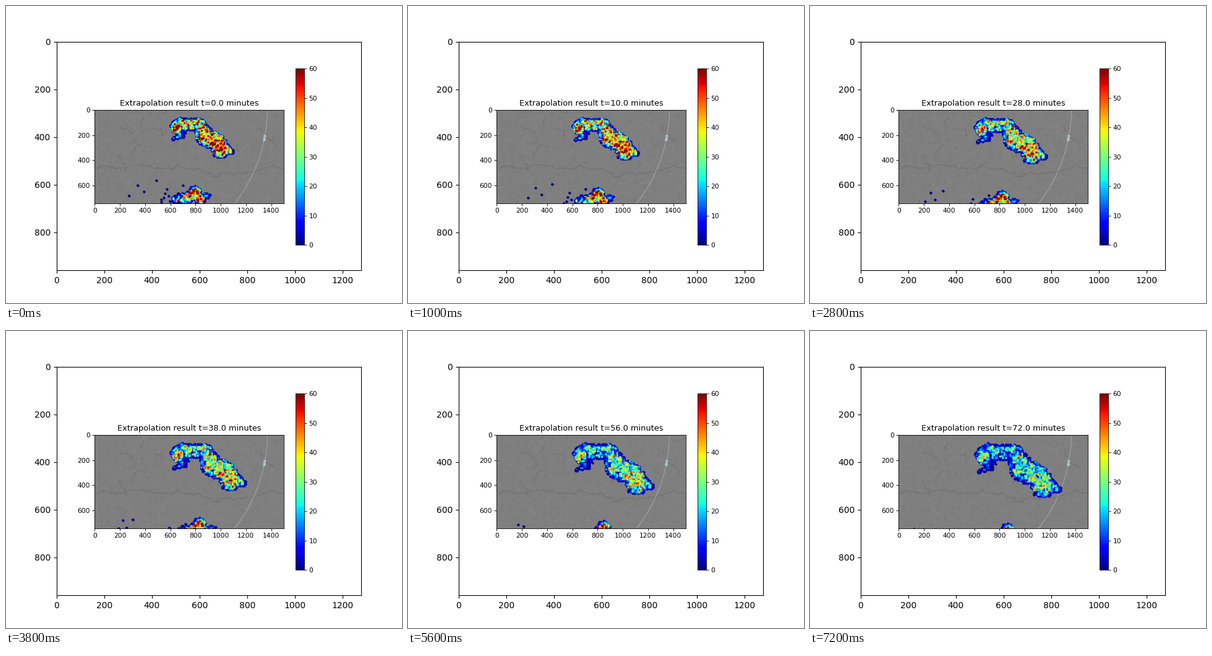
These frames come from a looping animation (640 px wide and 480 px high, 7400 ms). A matplotlib script:

```python
import numpy as np
import matplotlib.pyplot as plt
from matplotlib.animation import FuncAnimation
from matplotlib.cm import ScalarMappable
from matplotlib.colors import Normalize

W, H = 640, 480
FRAMES, INTERVAL, MINUTES = 37, 200, 2
ZOOM = 0.77                      # the inner figure is shown scaled down
LEFT, TOP, RIGHT, BOTTOM = 143.2, 167.7, 448.9, 319.0
UNIT = (RIGHT - LEFT) / 1500     # stage pixels per map unit

rng = np.random.default_rng(11)
fig = plt.figure(figsize=(W / 100, H / 100), dpi=100, facecolor="white")


def add_axes(x0, y0, x1, y1, **kw):
    """Axes placed by stage pixels, measured from the top left corner."""
    return fig.add_axes([x0 / W, 1 - y1 / H, (x1 - x0) / W, (y1 - y0) / H], **kw)


def shrink(axes):
    axes.tick_params(labelsize=10 * ZOOM, width=0.8 * ZOOM,
                     length=3.5 * ZOOM, pad=3.5 * ZOOM)
    for spine in axes.spines.values():
        spine.set_linewidth(0.8 * ZOOM)


def smooth_noise(passes, shape=(170, 320)):
    """Random field of unit deviation, softened by repeated blurring."""
    field = rng.normal(size=shape)
    for _ in range(passes):
        for axis in (0, 1):
            field = (np.roll(field, 1, axis) + 2 * field + np.roll(field, -1, axis)) / 4
    return field / field.std()


def sample(field, pts):
    col = np.clip((pts[:, 0] - LEFT).astype(int), 0, field.shape[1] - 1)
    row = np.clip((pts[:, 1] - TOP).astype(int), 0, field.shape[0] - 1)
    return field[row, col]


def draw_river(x, y, heading, steps):
    """A wandering line that keeps close to its first heading."""
    turn = heading + rng.normal(0, 0.75, steps)
    ax.plot(x + np.cumsum(2 * np.cos(turn)), y + np.cumsum(2 * np.sin(turn)),
            color="#4c4c4c", lw=0.5, alpha=0.45)


# Outer frame
outer = add_axes(81.6, 57.6, 574.4, 427.2, xlim=(-0.5, 1279.5), ylim=(959.5, -0.5))
outer.set_xticks(range(0, 1201, 200))
outer.set_yticks(range(0, 801, 200))

# Map panel, drawn in stage pixels
ax = add_axes(LEFT, TOP, RIGHT, BOTTOM)
relief = 127 + 1.5 * smooth_noise(3)
ax.imshow(relief, cmap="gray", vmin=0, vmax=255, aspect="auto",
          extent=(LEFT, LEFT + 320, TOP + 170, TOP), interpolation="bilinear")
ax.set(xlim=(LEFT, RIGHT), ylim=(BOTTOM, TOP))
x_marks, y_marks = range(0, 1401, 200), range(0, 601, 200)
ax.set_xticks([LEFT + UNIT * (v + 0.5) for v in x_marks], [str(v) for v in x_marks])
ax.set_yticks([TOP + UNIT * (v + 0.5) for v in y_marks], [str(v) for v in y_marks])
shrink(ax)
title = ax.set_title("", fontsize=12 * ZOOM, pad=6 * ZOOM)

draw_river(LEFT, 265, 0.05, 200)
for _ in range(13):
    draw_river(rng.uniform(LEFT, RIGHT), rng.uniform(TOP, BOTTOM),
               rng.uniform(0, 2 * np.pi), rng.integers(8, 24))

# Range ring with its label
radius = 250
ring_y = np.linspace(TOP, BOTTOM, 60)
ring_x = 422.5 - radius + np.sqrt(radius ** 2 - (ring_y - 165) ** 2)
ax.plot(ring_x, ring_y, color="#b0b0b0", lw=0.6)
ax.text(418.6, 212, "100", rotation=81, fontsize=3.9, color="#c4f4f4",
        ha="center", va="center", weight="bold")

# Rain bands: a few key points as (x, y, half width, strength)
NORTH = [(270, 214, 2, 0.1), (284, 209, 4, 0.2), (276, 195, 10, 0.6),
         (290, 191, 9, 0.45), (313, 190, 8, 0.35), (321, 210, 14, 0.6),
         (338, 218, 13, 0.6), (347, 231, 13, 0.75), (366, 236, 2, 0.1)]
SOUTH = [(273, 312, 6, 0.25), (290, 311, 8, 0.45), (306, 302, 10, 0.8),
         (314, 313, 8, 0.5), (327, 305, 2, 0.1)]


def build_band(keys):
    """Lattice points inside the band and the rain at each of them."""
    keys = np.array(keys, float)
    along = np.linspace(0, len(keys) - 1, 12 * len(keys))
    cx, cy, half, strength = (np.interp(along, range(len(keys)), k) for k in keys.T)
    gx, gy = np.meshgrid(np.arange(cx.min() - 20, cx.max() + 20, 1.75),
                         np.arange(cy.min() - 20, cy.max() + 20, 1.75))
    pts = np.column_stack([gx.ravel(), gy.ravel()])
    reach = half - np.hypot(pts[:, :1] - cx, pts[:, 1:] - cy)
    depth = reach.max(1) + 1.2 * sample(ragged, pts)
    gain = strength[reach.argmax(1)]
    rain = 60 * np.clip(depth / 3.5, 0, 1) * (gain + 0.3 * sample(texture, pts))
    inside = depth > 0
    return pts[inside], np.clip(rain[inside], 2, 75)


ragged, texture = smooth_noise(2), smooth_noise(1)
north, north_rain = build_band(NORTH)
south, south_rain = build_band(SOUTH)
north_drift = 0.005 * (north - (263, 178))
south_drift = (0.2, 0.28) + (south - (306, 291)) * (0.001, 0.003)

# Lone echoes: those in the west fan out, the others sink southwards
stray = np.concatenate([
    [(198.5, 306.5), (212.5, 290), (223, 300), (243, 282), (286, 290), (260, 296)],
    rng.uniform((250, 300), (266, 317), (6, 2))])
x = stray[:, 0]
west = x < 248
stray_drift = np.column_stack([np.where(west, -0.43 - 0.0128 * (x - 198), 0.1),
                               np.where(west, 0.33 + 0.006 * (x - 198), 0.58)])

place = np.concatenate([stray, north, south])
drift = np.concatenate([stray_drift, north_drift, south_drift])
rain = np.concatenate([np.zeros(len(stray)), north_rain, south_rain])
fade = np.repeat([0, 0.0055, 0.001], [len(stray), len(north), len(south)])
order = np.argsort(rain, kind="stable")   # strong echoes on top
place, drift, rain, fade = place[order], drift[order], rain[order], fade[order]

scale = Normalize(0, 60)
rim = ax.scatter(*place.T, color="#000090", s=7, marker="D", linewidths=0, zorder=2.3)
cells = ax.scatter(*place.T, c=rain, s=4.2, marker="D", cmap="jet", norm=scale,
                   linewidths=0, zorder=2.4)

# Colour bar
bar_axes = add_axes(467.8, 101.4, 481.9, 386.2)
bar = fig.colorbar(ScalarMappable(scale, "jet"), cax=bar_axes, ticks=range(0, 61, 10))
shrink(bar_axes)
bar.outline.set_linewidth(0.8 * ZOOM)


def update(i):
    t = MINUTES * i
    title.set_text(f"Extrapolation result t={t:.1f} minutes")
    for layer in (rim, cells):
        layer.set_offsets(place + drift * t)
    cells.set_array(rain * (1 - fade * t))
    return title, rim, cells


anim = FuncAnimation(fig, update, frames=FRAMES, interval=INTERVAL,
                     repeat=True, repeat_delay=0, blit=False)
plt.show()
```
